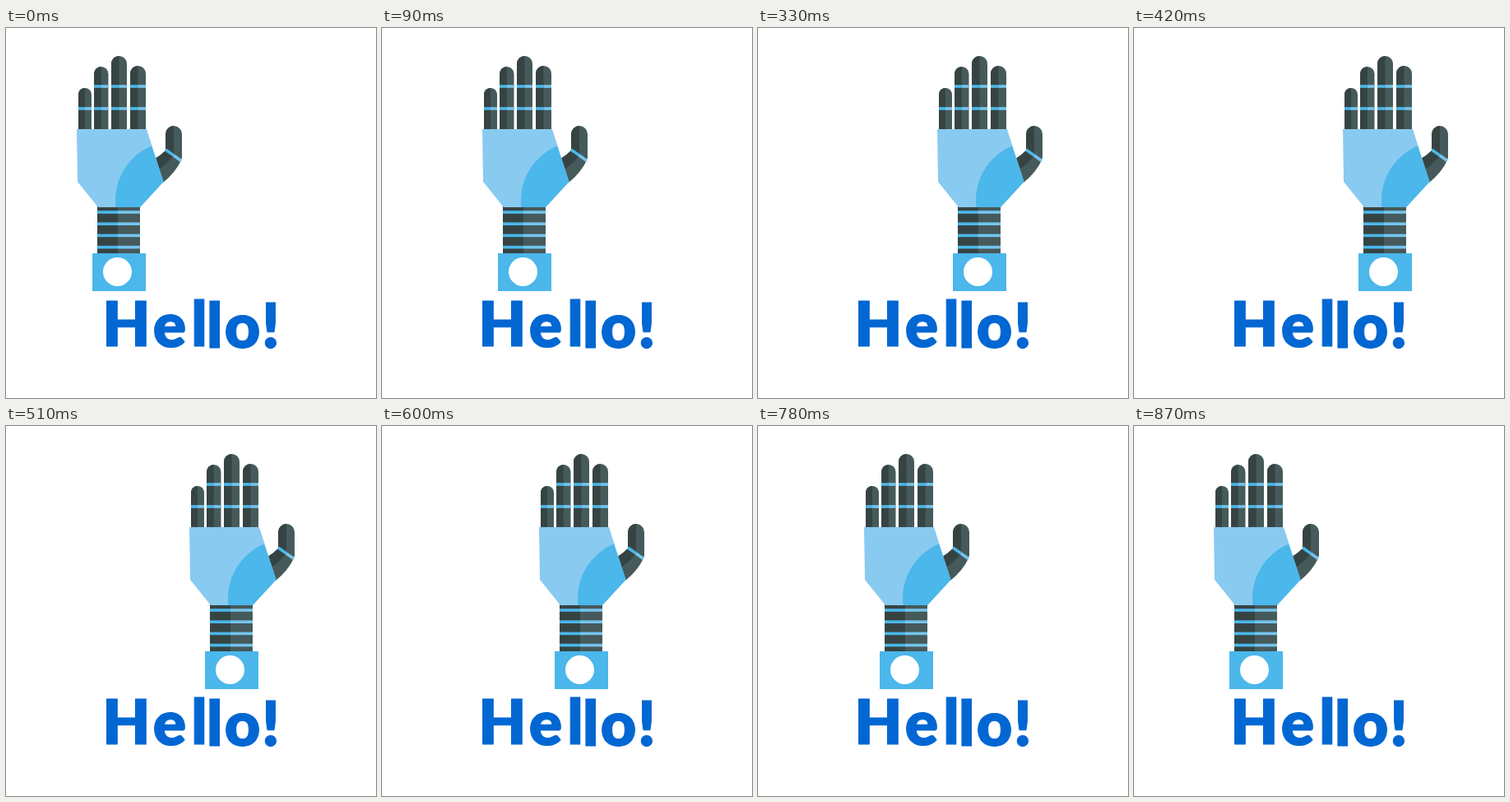
Recreate the animation shown at these times as an HTML page. Size 450x450 px, loop 0.9 s.

```html
<!DOCTYPE html>
<html lang="en">
<head>
<meta charset="utf-8">
<title>Hello</title>
<style>
  html, body { margin: 0; width: 100%; height: 100%; overflow: hidden; background: #fff; }
  svg { display: block; width: 100%; height: 100%; }
  .dark { fill: #354443; }
  .lit { fill: #465a5b; }
  .blue { fill: #4bb7ea; }
  .pale { fill: #89caf0; }
  .joint { fill: none; stroke: #4bb7ea; stroke-width: 3.6; }
  .shine { stroke: #74c5ee; }
  text {
    font: 900 75px Lato, "Open Sans", sans-serif;
    fill: #0267d2; stroke: #0267d2; stroke-width: 1; text-anchor: middle;
  }
</style>
</head>
<body>
<svg viewBox="0 0 450 450">
  <g id="hand">
    <g id="fingers"></g>
    <g id="wrist"></g>
    <g id="thumb">
      <path class="lit" d="M181 159Q188 155 194 149L213 161Q206 176 191 188Z"/>
      <path class="dark" d="M181 159Q188 155 194 149L203 156Q196 165 186 172Z"/>
      <path class="lit" d="M194 148V129A10 10 0 0 1 214 129V158L212 161Z"/>
      <path class="dark" d="M194 148V129A10 10 0 0 1 204 119V155Z"/>
      <path class="joint" d="M194 148L204 155"/>
      <path class="joint shine" d="M204 155L213 161.500"/>
    </g>
    <path class="pale" d="M86 123H171L191.500 187L163 218H112L87 187Z"/>
    <path class="blue" d="M177 143.500A71.500 71.500 0 0 0 133.500 218H163L191.500 187Z"/>
    <rect class="blue" x="105" y="274" width="65" height="46"/>
    <circle cx="135.500" cy="296.500" r="17.500" fill="#fff"/>
  </g>
  <text><tspan x="146.500" y="386.500">H</tspan><tspan x="199" y="387.500">e</tspan><tspan x="235" y="387">l</tspan><tspan x="253.800" y="388.500">l</tspan><tspan x="287.500" y="388.500">o</tspan><tspan x="322" y="388.500">!</tspan></text>
</svg>
<script>
const STEP = 30, FRAMES = 30, TURN = 14;
const hand = document.getElementById('hand');

const bar = (x, y, w, h, cls) =>
  `<rect class="${cls}" x="${x}" y="${y}" width="${w}" height="${h}"/>`;

// A band across a limb, brighter on its lit half.
const joint = (x, mid, end, y) =>
  `<path class="joint" d="M${x} ${y}H${mid}"/><path class="joint shine" d="M${mid} ${y}H${end}"/>`;

// A round-topped finger in two shades, crossed by joints.
function finger([x, w, top, joints]) {
  const r = w / 2, mid = x + r, end = x + w, base = 123;
  const side = `M${x} ${base}V${top + r}A${r} ${r} 0 0 1 `;
  return `<path class="lit" d="${side}${end} ${top + r}V${base}Z"/>` +
    `<path class="dark" d="${side}${mid} ${top}V${base}Z"/>` +
    joints.map(y => joint(x, mid, end, y)).join('');
}

document.getElementById('fingers').innerHTML = [
  [88, 16, 73, [98]],
  [107, 17.5, 47, [71, 98]],
  [128, 19, 34, [71, 98]],
  [151, 19, 46, [71, 98]]
].map(finger).join('');

document.getElementById('wrist').innerHTML =
  bar(111, 217, 52, 58, 'lit') + bar(111, 217, 25, 58, 'dark') +
  [0, 1, 2, 3].map(i => joint(111, 136, 163, 224 + i * 14.2)).join('');

// Steady slide right, then a slightly slower slide back.
function shift(n) {
  return n <= TURN ? n * 12 : Math.round(168 - (n - TURN) * 10.45);
}

function draw(now) {
  const n = Math.floor(now / STEP) % FRAMES;
  hand.setAttribute('transform', `translate(${shift(n)} 0)`);
}

let start = null;
function tick(now) {
  if (start === null) start = now;
  draw(now - start);
  requestAnimationFrame(tick);
}
draw(0);
requestAnimationFrame(tick);
</script>
</body>
</html>
```
